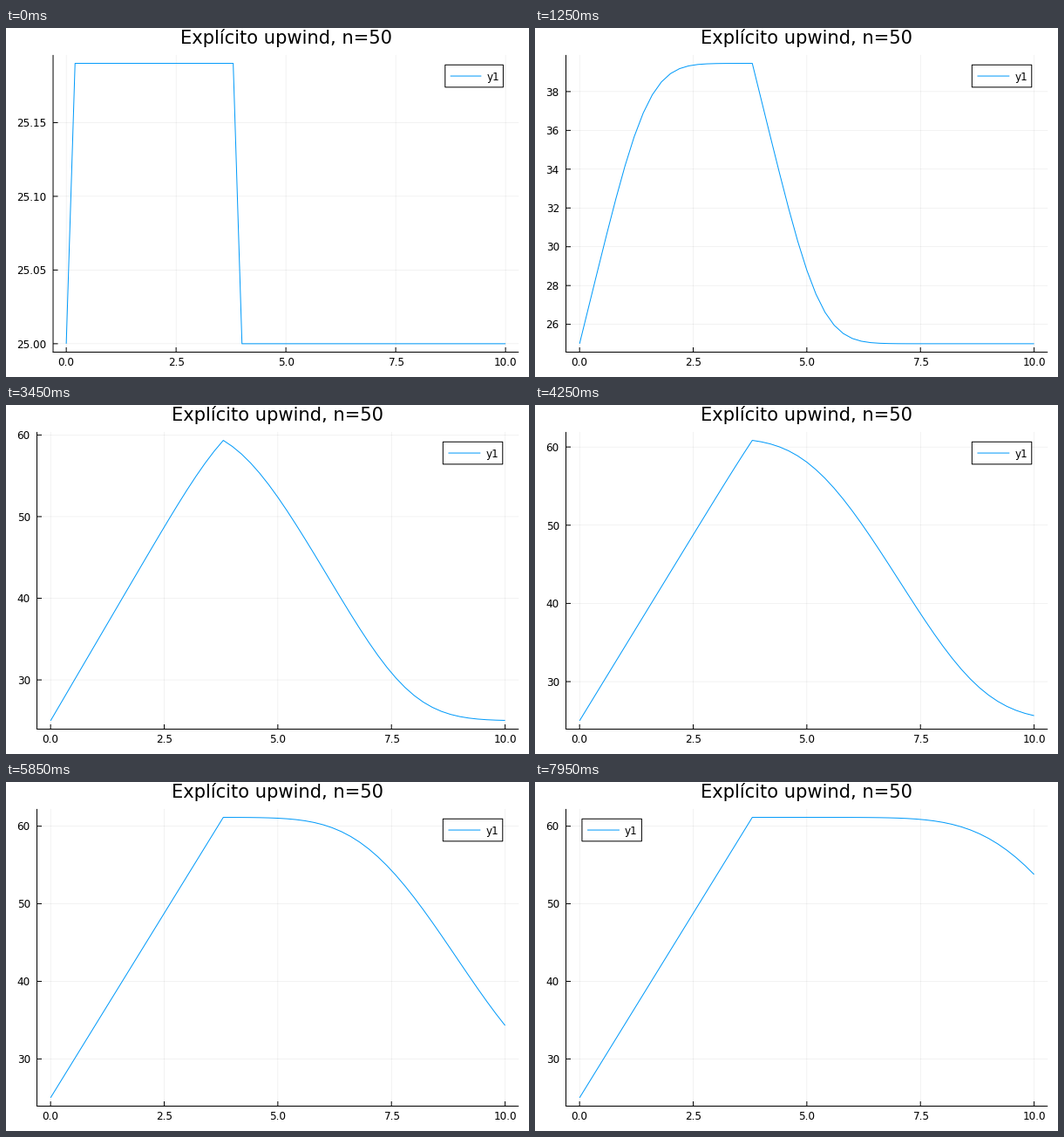
Animation, 600 px wide and 400 px high, one loop 8000 ms. Source, as a matplotlib script:

```python
import math

import numpy as np
import matplotlib.pyplot as plt
from matplotlib.animation import FuncAnimation
from matplotlib.lines import Line2D
from matplotlib.patches import Rectangle
from matplotlib.transforms import IdentityTransform

W, H, DPI = 600, 400, 100
PX = 72 / DPI                      # one pixel in points
FRAMES, INTERVAL = 160, 50
TOP, BOTTOM, RIGHT = 30.9, 371.5, 588.2
PAD = 0.03
BLUE = "#009AFA"
EM = 12                            # small text size in pixels
DROP = 0.729 * EM / 2 + 0.4        # from the middle of a label to its baseline

plt.rcParams["font.family"] = "DejaVu Sans"
plt.rcParams["text.hinting_factor"] = 32    # near-linear letter spacing

# Heated advection, explicit upwind scheme
N, COURANT, HEAT, T0 = 50, 0.1, 0.1902, 25.0
STEPS = 3                          # time steps per frame
x = np.linspace(0, 10, N + 1)
source = np.zeros(N + 1)
source[1:20] = HEAT


def solve():
    u = np.full(N + 1, T0)
    curves = []
    for k in range(STEPS * (FRAMES - 1) + 1):
        u[1:] += source[1:] - COURANT * np.diff(u)
        if k % STEPS == 0:
            curves.append(u.copy())
    return curves


curves = solve()


def nice_ticks(lo, hi):
    """Ticks scored by count, coverage and roundness of the step."""
    best, ticks, digits = -1, [], 0
    for z in (1, 0, -1, -2):
        for q, nice in ((1, 1), (5, 0.9), (2, 0.7), (2.5, 0.5), (3, 0.2)):
            step = q * 10.0 ** z
            first, last = math.ceil(lo / step), math.floor(hi / step)
            n = last - first + 1
            if not 4 <= n <= 8:
                continue
            score = (0.25 * (1 - abs(n - 5) / 5)
                     + 0.5 * (hi - lo) / ((n - 1) * step) + 0.25 * nice)
            if score > best + 1e-9:
                best = score
                ticks = [step * i for i in range(first, last + 1)]
                digits = max(0, -z + (q == 2.5))
    return ticks, digits


fig = plt.figure(figsize=(W / DPI, H / DPI), dpi=DPI, facecolor="white")
PIXELS = IdentityTransform()


def line(xs, ys, color="black", z=3, width=1, **kw):
    fig.add_artist(Line2D(xs, H - np.asarray(ys, float), color=color,
                          lw=width * PX, zorder=z, transform=PIXELS,
                          snap=False, solid_capstyle="butt", **kw))


def grid(xs, ys):
    line(xs, ys, z=1, width=0.5, alpha=0.1)


def text(px, py, s, ha="center", size=EM):
    fig.text(px, H - py, s, ha=ha, va="baseline", fontsize=size * PX,
             color="black", zorder=6, transform=PIXELS)


def legend(left, width, on_left):
    unit = width / 90
    box_w, box_h = 9 * unit + 13.2, 25.6
    x0 = left + 3 * unit if on_left else RIGHT - 3 * unit - box_w
    y0 = TOP + (BOTTOM - TOP) / 30
    mid = y0 + box_h / 2
    fig.add_artist(Rectangle((x0, H - y0 - box_h), box_w, box_h, fc="white",
                             ec="black", lw=PX, zorder=4, snap=False,
                             transform=PIXELS))
    line([x0 + unit, x0 + 7 * unit], [mid, mid], BLUE, 5)
    text(x0 + 8 * unit, mid + DROP, "y1", "left")


def update(i):
    fig.clear()
    u = curves[i]
    rise = u.max() - T0
    lo, hi = T0 - PAD * rise, u.max() + PAD * rise
    ticks, digits = nice_ticks(lo, hi)

    # decimals in the labels push the axis to the right
    left = 35.5 + (11.65 * (0.318 + 0.636 * digits) if digits else 0)
    width = RIGHT - left

    def to_x(v):
        return left + (v / 10 + PAD) / (1 + 2 * PAD) * width

    def to_y(v):
        return BOTTOM - (v - lo) / (hi - lo) * (BOTTOM - TOP)

    for v in (0, 2.5, 5, 7.5, 10):
        px = to_x(v)
        grid([px, px], [TOP, BOTTOM])
        line([px, px], [BOTTOM, BOTTOM - 5.5])
        text(px, 387, f"{v:.1f}")
    for v in ticks:
        py = to_y(v)
        grid([left, RIGHT], [py, py])
        line([left, left + 5.5], [py, py])
        text(left - 7.7, py + DROP, f"{v:.{digits}f}", "right")

    line([left - 0.5, RIGHT], [BOTTOM, BOTTOM])
    line([left, left], [TOP, BOTTOM])
    line(to_x(x), to_y(u), BLUE, 3.5, solid_joinstyle="round")

    # the legend leaves the top right corner once the curve enters it
    corner = (x > -0.3 + 0.75 * 10.6) & (u > lo + 0.75 * (hi - lo))
    legend(left, width, corner.any())
    text((left + RIGHT) / 2, 18.3, "Explícito upwind, n=50", size=21)
    return []


anim = FuncAnimation(fig, update, frames=FRAMES, interval=INTERVAL,
                     repeat=True, repeat_delay=0, blit=False)
plt.show()
```
